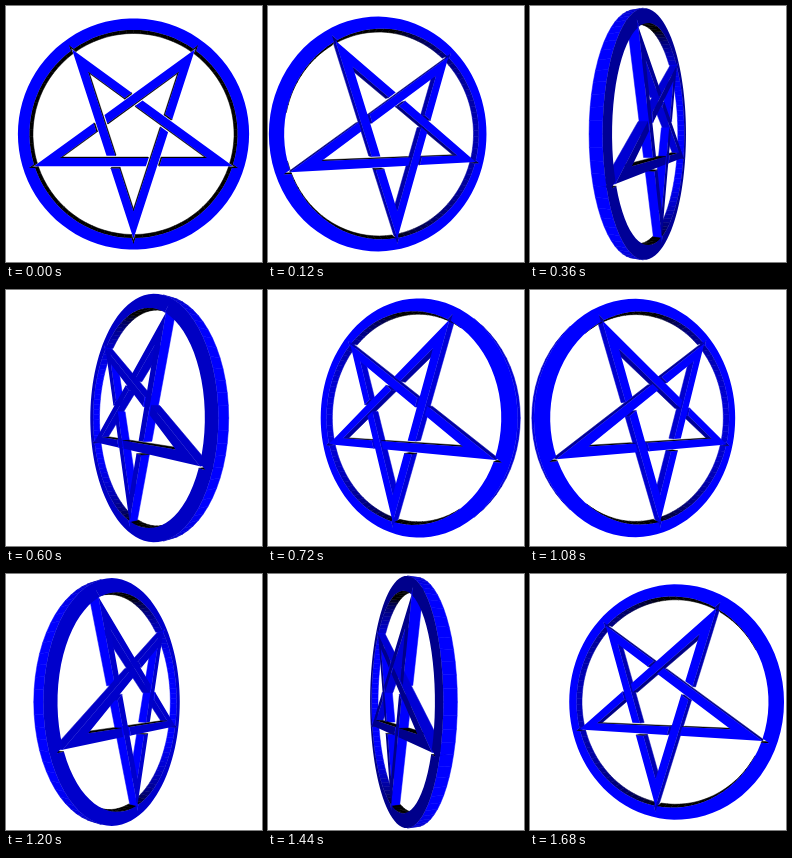
Animation, 256 px wide and 256 px high, one loop 1.8 s. Source, as an HTML page with a canvas:

```html
<!DOCTYPE html>
<html>
<head>
<meta charset="utf-8">
<title>Turning pentagram</title>
<style>
  html, body { margin: 0; width: 100%; height: 100%; overflow: hidden; background: #fff; }
  canvas { display: block; width: 256px; height: 256px; }
</style>
</head>
<body>
<canvas id="stage" width="256" height="256"></canvas>
<script>
const ctx = document.getElementById('stage').getContext('2d');
const RAD = Math.PI / 180;
const CX = 127.5, CY = 128;
const EYE = 258, HALF = 4.5;              // camera distance, half the plate thickness
const STEP_MS = 120, STEPS = 15, STEP_DEG = 23.85;
const R_OUT = 113.6, R_IN = 102.3;        // ring
const BAR_OUT = 31.8, BAR_IN = 23.5;      // star bars, distance of edges from the centre
const GAP = 2.1, NOTCH = 33.4;

const polar = (r, deg) => [r * Math.cos(deg * RAD), r * Math.sin(deg * RAD)];

// Crossing of two lines, each given by normal angle and distance from the centre
function meet(a, d, b, e) {
  const [ax, ay] = polar(1, a), [bx, by] = polar(1, b);
  const det = ax * by - ay * bx;
  return [(d * by - e * ay) / det, (e * ax - d * bx) / det];
}

// One corner of the star: a short arm that ends under a bar and a long arm that crosses it
function corner(t) {
  const s = t + 72, l = t - 72, far = t - 144;
  return [
    meet(s, BAR_OUT, l, BAR_OUT),
    meet(s, BAR_OUT, t, BAR_OUT + GAP),
    meet(s, BAR_IN, t, BAR_OUT + GAP),
    meet(s, BAR_IN, l, BAR_IN),
    meet(l, BAR_IN, far, BAR_IN - GAP),
    meet(l, BAR_OUT, far, BAR_IN - GAP)
  ];
}

function buildShapes() {
  const tips = [0, 1, 2, 3, 4].map(i => 90 + 72 * i);
  const rim = [];
  for (let a = 0; a < 360; a += 4) rim.push(polar(R_OUT, a));

  const hole = [];
  const half = Math.abs(72 - Math.acos(NOTCH / R_IN) / RAD);
  for (const t of tips) {
    hole.push(meet(t + 72, NOTCH, t - 72, NOTCH));
    for (let i = 0; i <= 18; i++) hole.push(polar(R_IN, t + half + (72 - 2 * half) * i / 18));
  }
  hole.reverse();
  return [[rim, hole], ...tips.map(t => [corner(t)])];
}

const shapes = buildShapes();

function trace(points) {
  points.forEach(([x, y], i) => i ? ctx.lineTo(x, y) : ctx.moveTo(x, y));
  ctx.closePath();
}

const shade = nz => `rgb(0,0,${Math.round(Math.min(255, 300 * Math.pow(Math.max(0, nz), 0.6)))})`;

function draw(deg) {
  const c = Math.cos(deg * RAD), s = Math.sin(deg * RAD);
  const project = ([x, y], z) => {
    const k = EYE / (EYE - (z * c - x * s));
    return [CX + (x * c + z * s) * k, CY + y * k];
  };

  ctx.fillStyle = '#fff';
  ctx.fillRect(0, 0, 256, 256);

  // Side walls that face the camera, far to near
  const walls = [];
  for (const contour of shapes.flat()) {
    contour.forEach((p, i) => {
      const q = contour[(i + 1) % contour.length];
      const len = Math.hypot(q[0] - p[0], q[1] - p[1]);
      const nx = (q[1] - p[1]) / len, ny = (p[0] - q[0]) / len;
      const mx = (p[0] + q[0]) / 2, my = (p[1] + q[1]) / 2;
      if (-nx * s * EYE - nx * mx - ny * my > 0) walls.push({ p, q, depth: -mx * s, nz: -nx * s });
    });
  }
  walls.sort((a, b) => a.depth - b.depth);
  ctx.lineWidth = 0.5;
  ctx.lineJoin = 'round';
  for (const { p, q, nz } of walls) {
    ctx.fillStyle = ctx.strokeStyle = shade(nz);
    ctx.beginPath();
    trace([project(p, HALF), project(q, HALF), project(q, -HALF), project(p, -HALF)]);
    ctx.fill();
    ctx.stroke();
  }

  // The flat side nearest the camera covers everything behind it
  const front = EYE * c > HALF, back = -EYE * c > HALF;
  if (!front && !back) return;
  const z = front ? HALF : -HALF;
  ctx.fillStyle = shade(Math.abs(c));
  for (const shape of shapes) {
    ctx.beginPath();
    for (const contour of shape) trace(contour.map(p => project(p, z)));
    ctx.fill('evenodd');
  }
}

let shown = -1;
function tick() {
  const step = Math.floor(performance.now() / STEP_MS) % STEPS;
  if (step !== shown) draw((shown = step) * STEP_DEG);
  requestAnimationFrame(tick);
}
tick();
</script>
</body>
</html>
```
